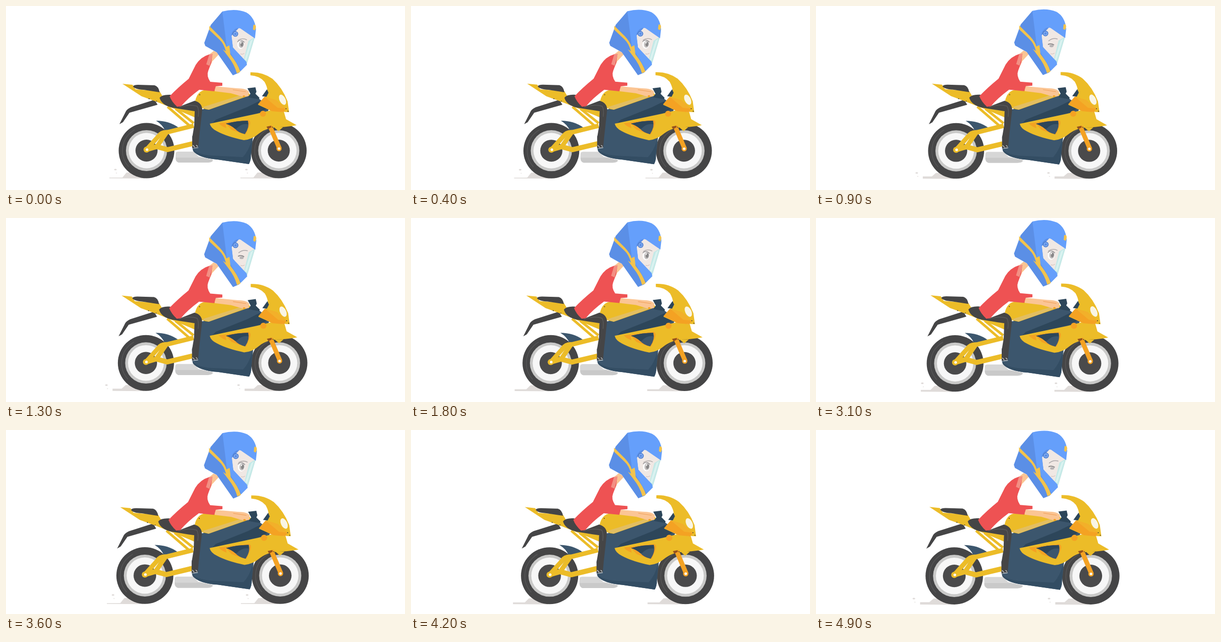
An HTML page with a canvas that plays this animation: 795 px wide and 369 px high, repeating every 5000 ms.

```html
<!DOCTYPE html>
<html lang="en">
<head>
<meta charset="utf-8">
<title>Motorbike ride</title>
<style>
html, body { margin: 0; width: 100%; height: 100%; overflow: hidden; background: #fff; }
canvas { display: block; width: 795px; height: 369px; }
</style>
</head>
<body>
<canvas id="stage" width="795" height="369"></canvas>
<script>
const ctx = document.getElementById('stage').getContext('2d');
const LOOP = 5000, STEP = 100, PIVOT = { x: 420, y: 208 };
const C = {
  yellow: '#ecbc28', orange: '#f4a223', navy: '#3c566d', deep: '#2d465a',
  coal: '#454546', red: '#ee5253', skin: '#fbc594', blue: '#5b8fe6',
  sky: '#659ffb', gold: '#f3c34c', pale: '#f0e8e4', ground: '#dfdbd9'
};

function fill(color, d) {
  ctx.fillStyle = color;
  ctx.fill(new Path2D(d));
}

function line(color, width, d) {
  ctx.strokeStyle = color;
  ctx.lineWidth = width;
  ctx.lineCap = 'butt';
  ctx.lineJoin = 'round';
  ctx.stroke(new Path2D(d));
}

function oval(color, x, y, rx, ry = rx, turn = 0) {
  ctx.fillStyle = color;
  ctx.beginPath();
  ctx.ellipse(x, y, rx, ry, turn, 0, Math.PI * 2);
  ctx.fill();
}

// Dust streaks and specks cycle through four poses.
const dust = [
  { left: 206, top: 344, speck: [218, 328] },
  { left: 214, top: 341, speck: [202, 334] },
  { left: 209, top: 342 },
  { left: 213, top: 342, speck: [216, 329] }
];

function drawDust({ left, top, speck }, shift) {
  ctx.save();
  ctx.translate(shift, 0);
  fill(C.ground, `M${left} 345.5V${top}H232L240 334L252 334L278 346Z`);
  if (speck) {
    const [x, y] = speck;
    oval(C.ground, x, y, 2.6, 1.6);
    oval(C.ground, x + 2, y + 7, 1.2, 0.7);
  }
  ctx.restore();
}

function drawWheel(x, y) {
  oval(C.coal, x, y, 55.5);
  ctx.strokeStyle = '#525253';
  ctx.lineWidth = 2;
  ctx.beginPath();
  ctx.arc(x, y, 48, 2.4, 4.2);
  ctx.stroke();
  oval('#c9c9c8', x, y, 41);
  oval('#f7f7f7', x, y, 35.5);
  oval('#4a4a4b', x, y, 22);
}

function drawRear() {
  fill('#d6d6d6', 'M338 296Q338 292 344 292H374L384 302L412 308V311Q410 314 402 314H344Q338 312 338 306Z');
  fill('#c9c9c9', 'M338 304H390L412 309Q411 313 402 314H344Q338 312 338 304Z');
  fill(C.coal, 'M296 188L249 203Q241 207 239 211L226 237L233 233L246 214L302 198Z');
  drawWheel(280, 290);
  drawWheel(543.5, 290);
  fill(C.navy, 'M299 230Q325 230 344 244L317 250Q312 238 299 230Z');
  line(C.yellow, 5, 'M322 202L368 242M338 206L374 235');
  line(C.yellow, 9, 'M280 288L304 261Q310 252 322 253L374 240');
  line(C.yellow, 10, 'M280 288L300 282L322 288L372 276');
  line(C.yellow, 9, 'M300 283L319 255');
  oval(C.yellow, 280, 288, 6);
  oval('#fff', 281, 288, 2.6);
  fill(C.yellow, 'M232 156L252 158L258 167L306 171L316 188L338 203L374 205L380 225L340 208L300 192L270 181Z');
  fill(C.coal, 'M253 161Q255 158 263 158L296 159Q304 161 306 173L274 168Q256 167 253 161Z');
}

function drawBody() {
  fill(C.navy, 'M389 208L484 180L504 186L526 202L516 224L492 262L488 300Q488 310 484 317L422 308Q384 305 373 290L371 262L380 240Z');
  fill('#334d63', 'M371 284Q378 298 410 300L472 303Q484 290 490 268L488 300Q488 310 484 317L422 308Q384 305 373 291Z');
  fill(C.deep, 'M418 228L480 203L504 191L524 203L506 214L410 236Z');
  fill(C.yellow, 'M376 196Q379 173 394 169L418 165Q460 163 481 171L487 179L404 208Q388 206 376 196Z');
  fill('#e2be62', 'M391 203L470 178L478 181L404 208Z');
  // Side panel with its vent
  fill(C.yellow, 'M406 236L500 216L528 209L554 213L558 227L579 239Q564 242 546 243Q521 243 505 255Q490 268 474 269Q440 262 420 251Q408 245 406 236Z');
  fill(C.orange, 'M424 235L482 228Q490 230 484 243L478 257Q460 255 446 247Q430 243 424 235Z');
  fill(C.yellow, 'M437 235L449 248L476 258L440 249Z');
  fill(C.navy, 'M438 236Q460 230 482 230Q486 242 476 257Q463 254 456 246Q448 239 438 236Z');
  fill(C.deep, 'M438 236Q460 230 482 230L482 237Q469 235 459 246L456 246Q448 239 438 236Z');
  oval(C.orange, 512, 216, 6);
  // Front cowl
  fill(C.yellow, 'M487 133Q512 132 531 146Q550 163 561 191L564 213L530 211L502 198L518 180Q525 170 515 152Q505 140 487 139Z');
  fill(C.orange, 'M502 197L515 182L538 189L558 206L553 213L530 211Z');
  fill('#f2b02a', 'M515 182L538 189L558 206L541 204Z');
  oval('#f9f5e5', 551, 188, 6, 11, -0.45);
  line(C.orange, 9, 'M526 241L545 286');
  fill(C.yellow, 'M534 243H552L543 251Z');
  oval(C.orange, 544, 286, 5.2);
  oval('#fff', 544, 286, 2.5);
  fill('#96521d', 'M519 242L528 240L529 243L522 247Z');
  for (const [x, y] of [[386, 178], [300, 191], [285, 186], [558, 206], [562, 211], [531, 243]])
    oval('#333', x, y, 0.9);
}

function drawRider() {
  fill(C.coal, 'M306 184Q311 177 328 178L332 190Q340 201 350 200L376 190Q390 194 391 207L385 262L383 283L371 285L371 264L375 240L376 211Q350 207 332 204Q310 199 306 184Z');
  line('#59595a', 1.5, 'M345 203Q366 196 381 201Q385 207 383 222');
  line('#d9dfe2', 1.2, 'M372 279L376 283M374 285L383 284M379 279L382 282');
  fill(C.skin, 'M416 161L460 165Q479 165 484 172L483 181L472 182L448 175L416 171Z');
  line('#f1a45f', 1.2, 'M452 168L478 172');
  oval(C.orange, 474, 181, 2.5, 1.8);
  fill(C.deep, 'M481 165L497 163L499 172L497 176L505 184L504 187L482 183L487 176Z');
  fill(C.deep, 'M510 181L520 167L523 174L519 182Z');
  fill(C.skin, 'M404 98L414 90L425 96L411 111L407 120Z');
  fill(C.red, 'M405 97Q388 102 378 118L364 146Q342 164 326 181Q330 192 341 202L349 201Q362 185 385 168L415 171L418 161L431 160V154L407 152Q399 140 403 130L409 114L411 99Z');
  fill('#f38f83', 'M405 97L412 96L406 120L399 117Z');
}

function drawHelmet(blink) {
  fill(C.pale, 'M449 56L462 42L496 62L481 113L474 112L450 83Z');
  if (blink) {
    line('#aaa6a8', 1.5, 'M463 71Q471 64 481 67');
    line('#8c898b', 2, 'M462 78Q468 75 474 79');
    oval('#b5b2b3', 469, 81, 4, 2.4);
  } else {
    line('#b2adad', 1.5, 'M462 69Q471 63 480 68');
    oval('#fff', 468, 77, 7, 9, 0.15);
    oval('#c2bfbf', 469, 77, 5, 7, 0.15);
    oval('#868586', 470, 77, 2.7, 4.4, 0.15);
    oval('#fff', 468, 74, 1.3);
    line('#8c898b', 1.2, 'M461 72Q468 65 475 73');
  }
  line('#d2bfba', 1, 'M467 96Q471 98 475 95');
  fill('#c4e9e7', 'M483 70L496 62L480 116L473 110Z');
  fill('#daf2f0', 'M487 70L492 66L479 109L475 108Z');
  fill(C.blue, 'M431 11L408 38L395 74L397 80L420 93L452 139L464 134L480 117L474 111L452 83L449 60L464 44Z');
  fill(C.sky, 'M431 11Q458 4 479 13Q496 23 498 47L496 65L467 45Q456 41 449 56L452 83L479 112L480 118L468 130Q455 105 440 84Z');
  fill(C.gold, 'M405 40L426 61Q437 73 439 82L445 79L447 97Q462 116 467 132L460 135Q455 117 443 102L432 87L438 91Q434 75 425 67L405 48Z');
  fill(C.gold, 'M493 38Q498 36 498 43L496 49L492 47Z');
  oval('#487bcf', 457, 56, 5.6);
  oval('#91b6f4', 457, 56, 3.9);
  oval(C.blue, 457, 56, 2.6);
}

function render(now) {
  const tick = Math.floor((now % LOOP) / STEP);
  const pose = tick % 4;
  const zoom = 1 + 0.032 * tick / 49;
  ctx.setTransform(1, 0, 0, 1, 0, 0);
  ctx.fillStyle = '#fff';
  ctx.fillRect(0, 0, 795, 369);
  ctx.translate(PIVOT.x, PIVOT.y);
  ctx.scale(zoom, zoom);
  ctx.translate(-PIVOT.x, -PIVOT.y);
  drawDust(dust[pose], 0);
  drawDust(dust[pose], 261);
  drawRear();
  drawBody();
  drawRider();
  drawHelmet(pose === 1);
}

const start = performance.now();
function loop() {
  render(performance.now() - start);
  requestAnimationFrame(loop);
}
loop();
</script>
</body>
</html>
```
